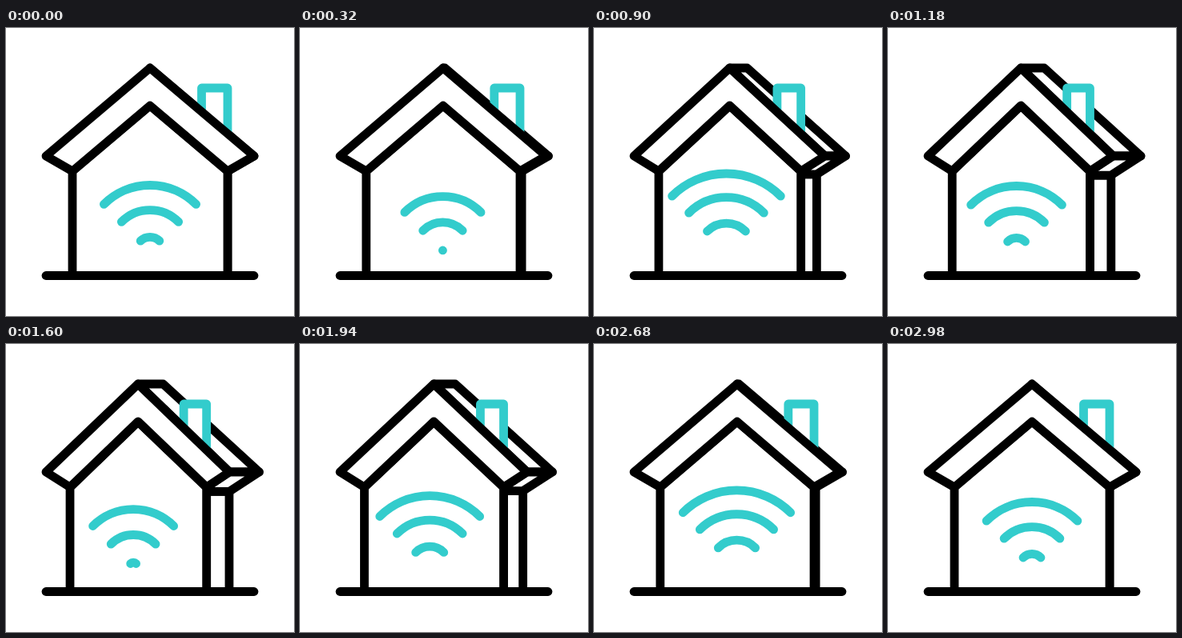
An HTML page that plays this animation: 360 px wide and 360 px high, repeating every 3 s.

```html
<!DOCTYPE html>
<html lang="en">
<head>
<meta charset="utf-8">
<title>Smart home</title>
<style>
  html, body { margin: 0; width: 100%; height: 100%; overflow: hidden; background: #fff; }
  svg { display: block; width: 100%; height: 100%; }
  path { fill: #fff; stroke: #000; stroke-width: 10.8; stroke-linecap: round; stroke-linejoin: round; }
  .accent { stroke: #33cccc; }
  .butt { stroke-linecap: butt; }
  .line { fill: none; }
</style>
</head>
<body>
<svg viewBox="0 0 360 360">
  <path id="roofSide"/>
  <path id="chimney" class="accent butt"/>
  <path id="wallSide"/>
  <path id="eaveSide"/>
  <path id="wallFront"/>
  <path id="roofFront"/>
  <path class="line" d="M50 309.5H310"/>
  <g id="waves"></g>
</svg>
<script>
const LOOP = 3000, BEAT = 600, BIRTH = 320, RINGS = 3;
const FLOOR = 309.5, WAVE_Y = 278;
const byId = id => document.getElementById(id);
const draw = (id, points, closed = true) =>
  byId(id).setAttribute('d', 'M' + points.map(q => q.map(v => v.toFixed(2)).join(' ')).join('L') + (closed ? 'Z' : ''));

const rings = Array.from({ length: RINGS }, () => {
  const ring = document.createElementNS('http://www.w3.org/2000/svg', 'path');
  ring.setAttribute('class', 'accent line');
  byId('waves').append(ring);
  return ring;
});

// cubic-bezier(.5, 0, .5, 1)
function ease(x) {
  let lo = 0, hi = 1;
  for (let i = 0; i < 24; i++) {
    const s = (lo + hi) / 2;
    if (1.5 * s * (1 - s) + s ** 3 < x) lo = s; else hi = s;
  }
  return lo * lo * (3 - 2 * lo);
}

function drawHouse(turn) {
  const mix = (a, b) => a + (b - a) * turn;
  const peak = [mix(180, 165), 50];
  const eave = [mix(310, 279), 160];
  const wallL = [mix(83, 80), 179];
  const wallR = [mix(277, 250.5), 179];
  const backPeak = [mix(180, 196.5), 50];
  const backEave = [mix(310, 316.5), 160];
  const backX = mix(277, 279);
  const sideTop = mix(179, 184.5);
  const roofY = x => 50 + (x - peak[0]) * 110 / (eave[0] - peak[0]);
  const left = mix(244.5, 222), right = mix(277, 250.5);

  draw('roofSide', [peak, backPeak, backEave, eave]);
  draw('chimney', [[left, roofY(left)], [left, 75], [right, 75], [right, roofY(right)]], false);
  draw('wallSide', [[wallR[0], sideTop], [backX, sideTop], [backX, FLOOR], [wallR[0], FLOOR]]);
  draw('eaveSide', [eave, backEave, [backX, sideTop], [wallR[0], sideTop], wallR]);
  draw('wallFront', [[wallL[0], FLOOR], wallL, [peak[0], 97], wallR, [wallR[0], FLOOR]], false);
  draw('roofFront', [[50, 160], peak, eave, wallR, [peak[0], 97], wallL]);
}

// Quarter-circle waves that leave the centre one per beat
function drawWaves(time, x) {
  const phase = (time - BIRTH + LOOP) % BEAT;
  rings.forEach((ring, i) => {
    const age = phase + i * BEAT;
    const r = 0.0605 * age - 3.7e-6 * age * age + 0.01;
    const c = r * Math.SQRT1_2;
    ring.setAttribute('d', `M${x - c} ${WAVE_Y - c}A${r} ${r} 0 0 1 ${x + c} ${WAVE_Y - c}`);
  });
}

function render(time) {
  const half = LOOP / 2;
  const turn = ease(time < half ? time / half : (LOOP - time) / half);
  drawHouse(turn);
  drawWaves(time, 180 - 21 * turn);
}

const start = performance.now();
function tick() {
  render((performance.now() - start) % LOOP);
  requestAnimationFrame(tick);
}
tick();
</script>
</body>
</html>
```
